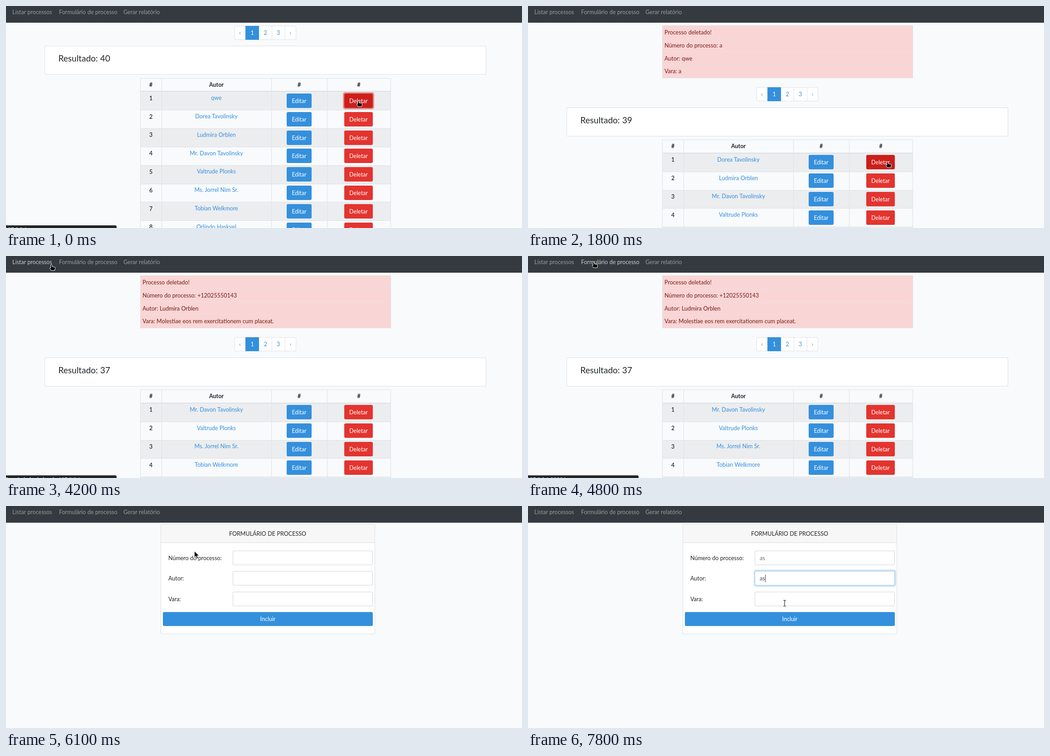
Write an HTML page that moves like this. It is 1138 px wide and 492 px high and loops after 8000 ms.

```html
<!DOCTYPE html>
<html lang="pt-BR">
<head>
<meta charset="utf-8">
<title>Processos</title>
<style>
  html, body { margin: 0; width: 100%; height: 100%; overflow: hidden; background: #f8fafc; }
  svg { display: block; width: 100vw; height: 100vh; }
  text { font-family: Lato, "Open Sans", sans-serif; font-size: 12.5px; word-spacing: .3px; white-space: pre; }
</style>
</head>
<body>
<svg id="stage" viewBox="0 0 1138 492"></svg>
<script>
const LOOP = 8000, TICK = 100;
const BLUE = '#3490dc', RED = '#e3342f', DARK_RED = '#cc1f1a', INK = '#212529', LINE = '#dee2e6';

const authors = ['qwe', 'Dorea Tavolinsky', 'Ludmira Orblen', 'Mr. Davon Tavolinsky',
  'Valtrude Plonks', 'Ms. Jorrel Nim Sr.', 'Tobian Welkmore', 'Orlindo Haskvel'];
const deletions = [
  ['a', 'a'],
  ['202.555.0147 x48116', 'Animi dignissimos molestiae dicta ipsam eum sint quia.'],
  ['+12025550143', 'Molestiae eos rem exercitationem cum placeat.']
];
const navItems = [['Listar processos', 14], ['Formulário de processo', 117], ['Gerar relatório', 259]];

// State changes, merged in order up to the current time.
const HOST = '127.0.0.1';
const steps = [
  [0, { deleted: 0, ring: true, status: HOST, nav: -1, form: false, field: -1, values: ['', '', ''] }],
  [800, { deleted: 1, ring: false, status: '' }],
  [2000, { ring: true, status: HOST }],
  [2300, { deleted: 2, ring: false, status: '' }],
  [3600, { ring: true, status: HOST }],
  [4100, { deleted: 3, ring: false, status: `Transferindo dados de ${HOST}…` }],
  [4300, { status: HOST + ':8000' }],
  [4600, { status: '' }],
  [4700, { status: HOST + ':8000/processo' }],
  [4800, { nav: 1 }],
  [5800, { status: HOST }],
  [6100, { form: true, nav: -1, status: '' }],
  [6900, { field: 0 }],
  [7100, { values: ['a', '', ''] }],
  [7200, { values: ['as', '', ''] }],
  [7500, { field: 1 }],
  [7600, { values: ['as', 'a', ''] }],
  [7700, { values: ['as', 'as', ''] }]
];

// Pointer path: time, x, y, shape; linear between points.
const path = [
  [0, 777, 210, 'hand'], [700, 777, 210, 'hand'], [800, 777, 212, 'arrow'],
  [1500, 766, 334, 'hand'], [1600, 763, 344, 'hand'], [1700, 802, 349, 'hand'],
  [1800, 793, 345, 'hand'], [2500, 793, 345, 'hand'], [2800, 775, 349, 'hand'],
  [2900, 772, 363, 'arrow'], [3000, 770, 362, 'arrow'], [3500, 770, 362, 'arrow'],
  [3600, 772, 345, 'hand'], [3700, 176, 57, 'arrow'], [4000, 176, 57, 'arrow'],
  [4100, 138, 39, 'arrow'], [4200, 100, 19, 'hand'], [4400, 102, 18, 'hand'],
  [4500, 102, 18, 'hand'], [4800, 145, 13, 'hand'], [5200, 145, 13, 'hand'],
  [5300, 202, 32, 'arrow'], [5400, 260, 51, 'arrow'], [5500, 318, 70, 'beam'],
  [5600, 375, 87, 'beam'], [5700, 375, 87, 'beam'], [5800, 405, 78, 'beam'],
  [5900, 402, 96, 'beam'], [6000, 402, 96, 'beam'], [6100, 415.5, 100, 'arrow'],
  [6200, 415.5, 100, 'arrow'], [6300, 436, 117, 'arrow'], [6400, 436, 117, 'arrow'],
  [6500, 542, 126, 'beam'], [6900, 542, 126, 'beam'], [7300, 556, 177, 'arrow'],
  [7400, 556, 177, 'arrow'], [7500, 558, 186, 'arrow'], [7600, 561, 196, 'beam'],
  [7800, 566, 215.5, 'beam'], [LOOP, 566, 215.5, 'beam']
];

const rect = (x, y, w, h, fill, r = 0, extra = '') =>
  `<rect x="${x}" y="${Math.round(y)}" width="${w}" height="${h}" rx="${r}" fill="${fill}" ${extra}/>`;

// Box with a crisp one-pixel border inside the given edges.
const box = (x, y, w, h, fill, border, r = 3) =>
  rect(x, y, w, h, border, r) + rect(x + 1, Math.round(y) + 1, w - 2, h - 2, fill, Math.max(0, r - 1));

const text = (s, x, y, fill = INK, extra = '') =>
  `<text x="${x}" y="${Math.round(y)}" fill="${fill}" ${extra}>${s}</text>`;

const centered = (s, x, y, fill, extra = '') => text(s, x, y, fill, `text-anchor="middle" ${extra}`);

const button = (label, x, y, w, fill, h = 32) =>
  rect(x, y, w, h, fill, 3) + centered(label, x + w / 2, Math.round(y) + h / 2 + 4.5, '#fff');

function stateAt(t) {
  return Object.assign({}, ...steps.filter(([start]) => start <= t).map(([, change]) => change));
}

function pointerAt(t) {
  const i = path.findLastIndex(([start]) => start <= t);
  const [t0, x0, y0, shape] = path[i], [t1, x1, y1] = path[i + 1];
  const k = (t - t0) / (t1 - t0);
  return { x: x0 + (x1 - x0) * k, y: y0 + (y1 - y0) * k, shape };
}

function drawPointer({ x, y, shape }) {
  const beam = 'M-3 -6.5H-1L0 -5.5L1 -6.5H3M0 -5.5V5.5M-3 6.5H-1L0 5.5L1 6.5H3';
  const shapes = {
    arrow: '<path d="M0 0V14L3.3 11L5.8 16.5L8.3 15.4L5.9 10.2H10.2Z" fill="#000" stroke="#fff" stroke-width=".9"/>',
    hand: `<path d="M-1.5 1Q0 -1 1.5 1V4.5L7 5.5Q8.8 6 8.5 8L7.5 13H-.5L-3.6 8.5Q-3.8 6.8 -1.5 7.5Z"
      fill="#000" stroke="#fff"/>`,
    beam: `<path d="${beam}" fill="none" stroke="#fff" stroke-width="2.6"/>
      <path d="${beam}" fill="none" stroke="#222" stroke-width="1.2"/>`
  };
  return `<g transform="translate(${x} ${y})">${shapes[shape]}</g>`;
}

function drawNav(active) {
  return rect(0, 0, 1138, 37, '#343a40') +
    navItems.map(([label, x], i) => text(label, x, 18, i === active ? '#ccced0' : '#999c9f')).join('');
}

function drawAlert(deleted) {
  const [number, court] = deletions[deleted - 1];
  const lines = ['Processo deletado!', `Número do processo: ${number}`,
    `Autor: ${authors[deleted - 1]}`, `Vara: ${court}`];
  return box(296, 43, 553, 117, '#f9d6d5', '#e6dde0', 0) + lines.map((line, i) =>
    (i ? rect(297, 43 + 28.8 * i, 551, 1, '#f0dadb') : '') + text(line, 301, 63 + 28.8 * i, '#761b18')).join('');
}

function drawPagination(y) {
  const edges = [504, 528, 558, 586, 615, 640];
  let out = box(504, y, 136, 31, '#fff', LINE);
  ['‹', '1', '2', '3', '›'].forEach((label, i) => {
    const left = edges[i], w = edges[i + 1] - left;
    if (i === 1) out += rect(left, y, w, 31, BLUE);
    else if (i > 2) out += rect(left, y, 1, 31, LINE);
    out += centered(label, left + w / 2, y + 20, ['#6c757d', '#fff'][i] || BLUE);
  });
  return out;
}

function drawTable(top, { deleted, ring }, hover) {
  const columns = [296, 343, 585, 708, 848], body = top + 29.6;
  const mid = i => (columns[i] + columns[i + 1]) / 2;
  let out = '', buttons = '';
  for (let i = 0; i < 8; i++) {
    const y = body + 40.8 * i;
    if (i % 2 === 0) out += rect(296, y, 553, 41, '#ecedef');
    if (i) out += rect(296, y, 553, 1, LINE);
    out += centered(i + 1, mid(0), y + 19.2, INK, 'font-weight="600"') +
      centered(authors[deleted + i] || '', mid(1), y + 18.7, BLUE);
    const focused = ring && i === 0;
    if (focused) buttons += rect(743, y + 1.4, 69, 38, RED, 5, 'opacity=".5"');
    buttons += button('Editar', 619, y + 4.4, 55, BLUE) +
      button('Deletar', 746, y + 4.4, 63, i === 0 && (hover || focused) ? DARK_RED : RED);
  }
  ['#', 'Autor', '#', '#'].forEach((label, i) =>
    out += centered(label, mid(i), top + 19, INK, 'font-weight="700"'));
  out += rect(296, top, 553, 1, LINE) + rect(296, body - 1.2, 553, 2, LINE);
  columns.forEach(x => out += rect(x, top, 1, 400, LINE));
  return out + buttons;
}

function drawList(state, hover) {
  const shift = state.deleted ? 136.4 : 0;
  return (state.deleted ? drawAlert(state.deleted) : '') +
    drawPagination(44 + shift) +
    box(85, 88.2 + shift, 974, 64, '#fff', '#dddfe1') +
    text(`Resultado: ${40 - state.deleted}`, 115.5, 123.4 + shift, INK, 'style="font-size:19px"') +
    drawTable(160 + shift, state, hover);
}

function drawForm({ field, values }) {
  let out = box(341, 40, 473, 244, '#fff', '#dddfe1') +
    rect(342, 41, 471, 40, '#f7f7f7', 2) + rect(342, 81, 471, 1, '#dfdfdf') +
    centered('FORMULÁRIO DE PROCESSO', 577, 66, INK);
  ['Número do processo:', 'Autor:', 'Vara:'].forEach((label, i) => {
    const y = Math.round(99 + 45.3 * i), focused = i === field;
    out += text(label, 358, y + 21);
    if (focused) out += rect(498, y - 3, 314, 38, BLUE, 5, 'opacity=".25"');
    out += box(500, y, 309, 32, '#fff', focused ? '#a1cbef' : '#ced4da') +
      text(values[i], 511, y + 21, focused ? '#495057' : '#6c7075');
    if (focused) out += rect(511 + values[i].length * 6, y + 8, 1, 17, '#343a40');
  });
  return out + button('Incluir', 346, 235, 463, BLUE, 31);
}

function drawStatus(message) {
  return message && rect(-4, 486, 248, 20, '#3f4347', 3) + rect(-4, 487, 247, 20, '#232629', 3) +
    text(message, -3, 499, '#fff', 'style="font-size:11.8px"');
}

function draw(t) {
  const state = stateAt(t), pointer = pointerAt(t);
  const onLink = pointer.shape === 'hand', inNav = pointer.y < 37;
  const active = onLink && inNav ? (pointer.x < 110 ? 0 : 1) : state.nav;
  return rect(0, 0, 1138, 492, '#f8fafc') +
    (state.form ? drawForm(state) : drawList(state, onLink && !inNav)) +
    drawNav(active) + drawStatus(state.status) + drawPointer(pointer);
}

const stage = document.getElementById('stage');
const begin = performance.now();
let shown = -1;
function tick() {
  const t = Math.floor((performance.now() - begin) % LOOP / TICK) * TICK;
  if (t !== shown) stage.innerHTML = draw(shown = t);
  requestAnimationFrame(tick);
}
tick();
</script>
</body>
</html>
```
